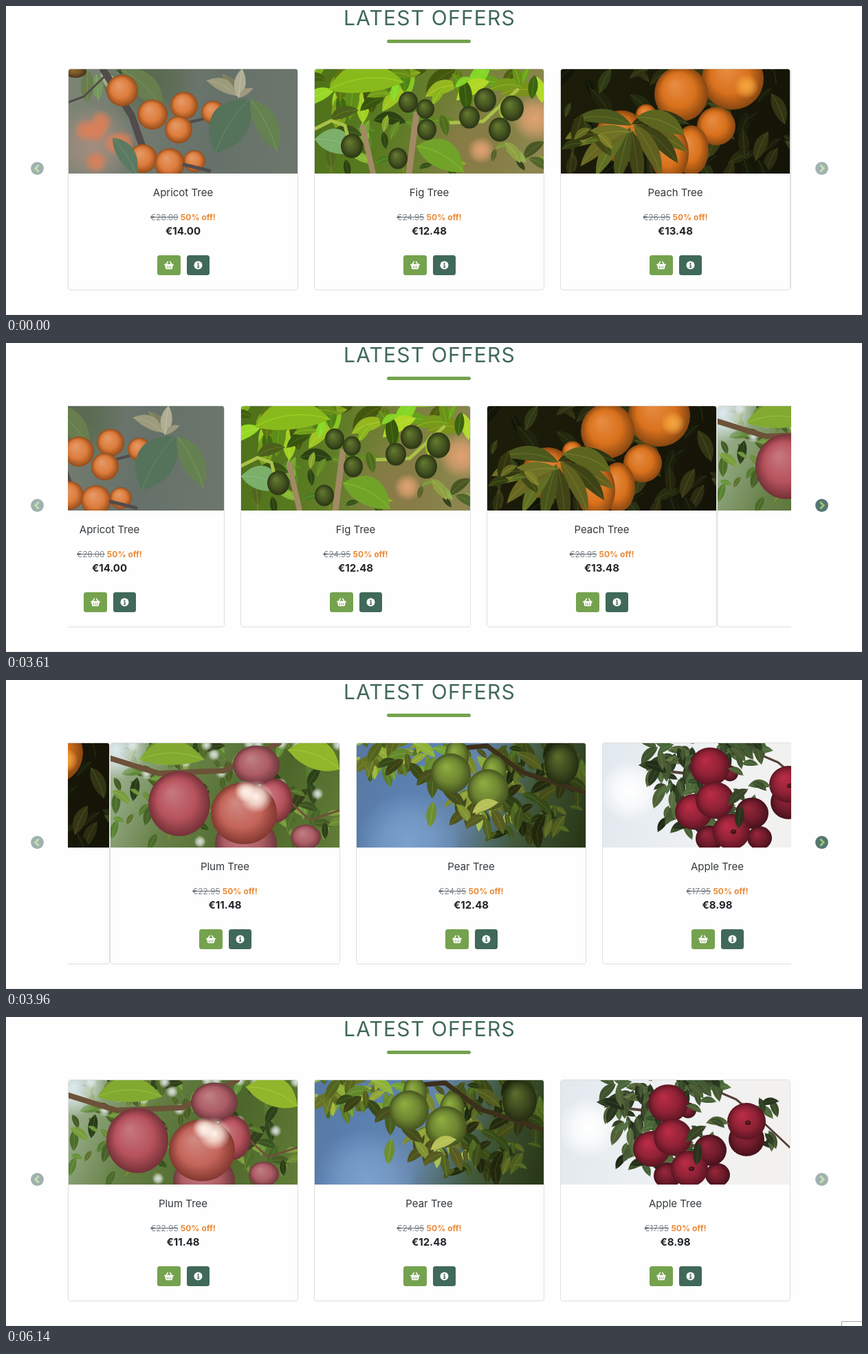
An HTML page with a canvas that plays this animation: 1245 by 450 pixels, repeating every 6.47 s.

```html
<!DOCTYPE html>
<html lang="en">
<head>
<meta charset="utf-8">
<title>Latest offers</title>
<style>
html, body { margin: 0; width: 100%; height: 100%; overflow: hidden; background: #fefefe; }
body { position: relative; font-family: Inter, Arial, sans-serif; color: #212529; }
h2, .bar, .view, .track, .card, .card > *, .arrow, .foot, .tip { position: absolute; margin: 0; }
h2 { left: 0; top: -1px; width: 1232px; line-height: 36px; text-align: center;
  font-size: 30px; font-weight: 400; letter-spacing: 1.2px; color: #406959; }
.bar { left: 554px; top: 48.5px; width: 122px; height: 5.5px; border-radius: 3px; background: #74a24e; }
.view { left: 90px; top: 91px; width: 1051.5px; height: 324px; overflow: hidden; }
.track { inset: 0; animation: slide 6470ms step-end infinite; }
.card { top: 0; width: 333px; height: 321px; border: 1px solid #dfdfdf; border-radius: 4px; overflow: hidden; }
.card canvas { left: 0; top: 0; }
.card p { width: 100%; text-align: center; white-space: nowrap; }
.name { top: 171px; font-size: 15px; line-height: 18px; color: #33383c; }
.cut { top: 208px; font-size: 12px; line-height: 15px; }
.cut s { font-weight: 300; color: #5f686f; }
.cut b { color: #ea8935; }
.now { top: 226.5px; font-size: 15px; line-height: 18px; font-weight: 700; }
.btn { top: 271px; height: 29px; border-radius: 3.5px; }
.buy { left: 129px; width: 34px; background: #74a24e; }
.info { left: 172px; width: 33px; background: #406959; }
.btn svg { display: block; width: 100%; height: 100%; }
.arrow { top: 227px; width: 19px; height: 19px; opacity: .5; }
.prev { left: 35.5px; transform: scaleX(-1); }
.next { left: 1177px; animation: hover 6470ms step-end infinite; }
.foot { left: 0; right: 0; top: 449px; height: 1px; background: #ececec; }
.tip { left: 1215px; top: 443px; width: 30px; height: 7px; box-sizing: border-box; background: #fff;
  border: solid #a8a8a8; border-width: 1px 0 0 1px; opacity: 0; animation: tip 6470ms step-end infinite; }
@keyframes hover {
  0% { opacity: .5; }
  4.32% { opacity: .7; }
  5.25% { opacity: .9; }
  86.7% { opacity: .7; }
  87.94%, 100% { opacity: .5; }
}
@keyframes tip {
  0% { opacity: 0; }
  93.97% { opacity: .5; }
  94.89%, 100% { opacity: 1; }
}
</style>
</head>
<body>
<svg width="0" height="0" style="position:absolute">
  <symbol id="chevron" viewBox="0 0 19 19">
    <circle cx="9.5" cy="9.5" r="9.4" fill="#406965"/>
    <path d="M7.3 4.6 12.2 9.5 7.3 14.4" fill="none" stroke="#98bc5c" stroke-width="2.9"/>
  </symbol>
  <symbol id="basket" viewBox="-17 -14.5 34 29">
    <path d="M-4.2-1-1.6-5.2M4.2-1 1.6-5.2" stroke="#fff" stroke-width="1.5" stroke-linecap="round"/>
    <rect x="-6.8" y="-1.8" width="13.6" height="2.1" rx=".9" fill="#fff"/>
    <path d="M-5.8 0H5.8L4.9 4.8Q4.7 5.8 3.7 5.8H-3.7Q-4.7 5.8-4.9 4.8Z" fill="#fff"/>
    <path d="M-2.6 1.3V4.3M0 1.3V4.3M2.6 1.3V4.3" stroke="#74a24e"/>
  </symbol>
  <symbol id="about" viewBox="-16.5 -14.5 33 29">
    <circle r="6" fill="#fff"/>
    <circle cy="-2.7" r="1.1" fill="#406959"/>
    <path d="M-1.4-.4H.5V3M-1.6 3H1.7" fill="none" stroke="#406959" stroke-width="1.3"/>
  </symbol>
</svg>

<h2>LATEST OFFERS</h2>
<div class="bar"></div>
<svg class="arrow prev"><use href="#chevron"/></svg>
<div class="view"><div class="track"></div></div>
<svg class="arrow next"><use href="#chevron"/></svg>
<div class="foot"></div>
<div class="tip"></div>

<script>
const LOOP = 6470, PAGE = 1051, W = 333, H = 152;

// one page glides past with a sine ease, held for a tick at a time
function slideRule() {
  const first = 3480, tick = 65, start = 3505, span = 509;
  let css = '0% { transform: none; }';
  for (let k = 1; k < 10; k++) {
    const t = first + k * tick, p = Math.min(1, (t - start) / span);
    const x = Math.round(PAGE * (1 - Math.cos(Math.PI * p)) / 2);
    css += `${((t - 1) / LOOP * 100).toFixed(2)}% { transform: translateX(${-x}px); }`;
  }
  return `@keyframes slide { ${css} 100% { transform: translateX(${-PAGE}px); } }`;
}
const style = document.createElement('style');
style.textContent = slideRule();
document.head.append(style);

let c, seed;
const rand = () => (seed = (seed * 16807) % 2147483647) / 2147483647;
const vary = amount => (rand() - .5) * 2 * amount;
const hsl = ([h, s, l], lift = 0) => `hsl(${h} ${s}% ${l + lift}%)`;

function fade(x, y, ...cols) {
  const g = c.createLinearGradient(0, 0, x, y);
  cols.forEach((col, i) => g.addColorStop(i / (cols.length - 1), col));
  c.fillStyle = g;
  c.fillRect(0, 0, W, H);
}

function glow(col, x, y, r) {
  const g = c.createRadialGradient(x, y, 0, x, y, r);
  g.addColorStop(0, col);
  g.addColorStop(.5, col + 'b0');
  g.addColorStop(1, col + '00');
  c.fillStyle = g;
  c.fillRect(x - r, y - r, 2 * r, 2 * r);
}

function fruit(col, tall, ...spots) {
  for (const [x, y, r] of spots) {
    c.save();
    c.translate(x, y);
    c.scale(r, r * tall);
    const g = c.createRadialGradient(-.25, -.35, .05, 0, 0, 1);
    g.addColorStop(0, hsl(col, 10));
    g.addColorStop(.6, hsl(col));
    g.addColorStop(1, hsl(col, -col[2] * .38));
    c.fillStyle = g;
    c.beginPath();
    c.arc(0, 0, 1, 0, 7);
    c.fill();
    c.restore();
  }
}

// an arching leaf with a midrib, growing from its stalk
function leaf(col, x, y, len, angle, wide = .26) {
  const w = len * wide, sag = len * .15 * Math.cos(angle);
  c.save();
  c.translate(x, y);
  c.rotate(angle);
  c.beginPath();
  c.moveTo(0, 0);
  c.bezierCurveTo(len * .25, w - sag, len * .7, w - sag, len, 0);
  c.bezierCurveTo(len * .7, -w - sag, len * .25, -w - sag, 0, 0);
  c.fillStyle = hsl(col);
  c.fill();
  c.beginPath();
  c.moveTo(0, 0);
  c.quadraticCurveTo(len / 2, -sag * 1.4, len, 0);
  c.strokeStyle = hsl(col, 9);
  c.lineWidth = .8;
  c.stroke();
  c.restore();
}

function foliage(n, [x, y, w, h], size, angle, [hue, sat, light]) {
  while (n--) {
    const shade = [hue + vary(9), sat, light * (1 + vary(.5))];
    leaf(shade, x + rand() * w, y + rand() * h, size * (.8 + vary(.35)), angle + vary(1.3));
  }
}

function twig(col, width, ...pts) {
  c.strokeStyle = col;
  c.lineWidth = width;
  c.lineJoin = c.lineCap = 'round';
  c.beginPath();
  pts.forEach(p => c.lineTo(...p));
  c.stroke();
}

function apricot() {
  const bark = '#514b4c', green = [88, 24, 40];
  fade(W, 60, '#7c8474', '#737b70', '#657169', '#6d766c');
  glow('#58694f', 120, 15, 70);
  glow('#a18d7f', 35, 110, 60);
  for (let i = 0; i < 6; i++) glow('#dc7f58', 25 + rand() * 65, 60 + rand() * 85, 18);
  foliage(7, [0, 0, 110, 8], 46, .8, green);
  leaf(green, 76, 0, 86, .77);
  twig(bark, 3, [53, 10], [22, 40], [0, 48]);
  twig(bark, 10, [50, 0], [92, 68], [110, 120]);
  twig(bark, 4, [165, 80], [225, 65]);
  foliage(6, [240, 34, 12, 8], 42, -1.6, [55, 14, 46]);
  fruit([24, 70, 55], 1, [78, 31, 23], [122, 66, 22], [210, 63, 17], [168, 53, 20], [160, 88, 20],
    [108, 130, 21], [183, 134, 16], [147, 137, 22]);
  fruit([35, 48, 30], .6, [10, 3, 16]);
  leaf([130, 15, 39], 262, 44, 92, 2.13, .4);
  leaf([95, 23, 41], 265, 44, 84, 1.1);
  leaf([130, 14, 42], 64, 100, 64, 1);
  twig(bark, 5, [168, 139], [205, 148]);
}

function fig() {
  const stem = '#a28a66', lime = '#a9c148';
  fade(W, 90, '#4d7019', '#587a20', '#78803c', '#8d8650');
  glow('#8a7b48', 230, 120, 75);
  glow('#e2a272', 242, 118, 20);
  glow('#e2a272', 320, 72, 34);
  foliage(55, [0, -12, W, 55], 50, 2.2, [80, 70, 34]);
  foliage(28, [0, 60, 195, 85], 42, .8, [84, 55, 31]);
  foliage(8, [255, 105, 70, 40], 36, .6, [75, 40, 34]);
  leaf([79, 74, 42], 20, 30, 110, -.1);
  leaf([105, 30, 55], 0, 102, 62, .3, .38);
  leaf([84, 60, 40], 148, 112, 78, .5, .35);
  twig(lime, 5, [0, 87], [24, 75], [44, 82], [48, 98]);
  twig(lime, 5, [198, 78], [245, 76], [295, 30]);
  twig(stem, 9, [148, 66], [137, 152]);
  twig(stem, 8, [70, 85], [85, 152]);
  fruit([78, 44, 23], 1.1, [136, 48, 14], [161, 58, 13], [163, 88, 14], [121, 130, 14],
    [287, 57, 17], [225, 70, 15], [248, 45, 16], [269, 88, 16], [54, 112, 16]);
}

function peach() {
  const ripe = [27, 77, 48], olive = [68, 52, 26];
  fade(W, H, '#1d1d0a', '#141307');
  foliage(75, [0, -15, W, H], 46, 1.6, [70, 45, 11]);
  fruit(ripe, 1, [124, 66, 15], [250, 14, 45], [226, 83, 28], [88, 98, 38]);
  fruit(ripe, 1.45, [190, 118, 25], [158, 122, 28]);
  fruit(ripe, 1.03, [175, 36, 39]);
  glow('#f4a63e', 270, 25, 18);
  for (let i = 0; i < 10; i++) leaf([68 + vary(9), 50, 22 + vary(9)], 100 + vary(8), 86 + vary(7), 84, i * .36, .17);
  leaf(olive, 110, 70, 74, .35);
  foliage(8, [30, 65, 30, 45], 45, 1.9, olive);
}

function plum() {
  const skin = [354, 41, 52], bark = '#6c5238';
  fade(W, H, '#a9bda0', '#668047', '#4c662a', '#627d38');
  foliage(130, [-15, -15, W, H], 32, 1, [83, 42, 30]);
  for (let i = 0; i < 22; i++) glow('#dbe4dd', rand() * W, rand() ** 2 * H, 9);
  glow('#dde9f0', 8, 8, 45);
  leaf([80, 55, 43], 42, 24, 94, 0);
  leaf([76, 62, 44], 333, 38, 80, 3.5, .35);
  twig(bark, 8, [0, 22], [70, 44], [165, 40], [245, 0]);
  twig(bark, 3, [250, 75], [290, 112], [333, 98]);
  fruit([354, 33, 52], .84, [212, 32, 34], [284, 137, 22], [197, 146, 45]);
  fruit(skin, 1.2, [238, 84, 27]);
  fruit(skin, 1.05, [100, 88, 45]);
  fruit([6, 47, 56], .94, [194, 102, 48]);
  glow('#fff4ea', 212, 78, 24);
  glow('#fff4ea', 196, 70, 16);
}

function pear() {
  const skin = [77, 46, 36];
  fade(W, 110, '#5878a2', '#5a80b1', '#6485a9', '#41583a', '#293818');
  glow('#7ba0cc', 75, 145, 75);
  foliage(48, [5, -14, 125, 52], 36, 1.7, [76, 50, 32]);
  foliage(45, [110, 0, 110, 100], 38, 1.6, [75, 47, 32]);
  foliage(80, [200, -14, 130, 145], 38, 1.5, [78, 50, 19]);
  twig('#3c301b', 7, [140, 8], [190, 4], [240, 42], [W, 72]);
  fruit([78, 42, 20], 1.2, [298, 30, 25]);
  for (const [x, y, r] of [[137, 44, 29], [191, 68, 30]]) {
    fruit(skin, 1.4, [x + r * .3, y - r * .85, r * .6]);
    fruit(skin, 1, [x, y, r]);
  }
  foliage(14, [145, 85, 100, 25], 38, 1.6, [70, 46, 40]);
}

function apple() {
  const skin = [349, 62, 35], green = [92, 27, 23], bark = '#554338';
  fade(W, 50, '#e1e9ef', '#eff1f2', '#f3f1ef');
  glow('#ffffff', 40, 70, 45);
  twig(bark, 3, [190, 0], [255, 28], [295, 62], [W, 98]);
  twig(bark, 4, [85, 40], [130, 45], [180, 70]);
  foliage(48, [75, 0, 75, 62], 34, 2.5, green);
  foliage(28, [165, -12, 75, 32], 34, .9, green);
  foliage(45, [95, 65, 135, 58], 32, 2, green);
  foliage(9, [285, 25, 25, 70], 26, .6, green);
  fruit([349, 60, 27], .95, [155, 139, 20], [228, 138, 18], [270, 86, 26], [217, 102, 24], [185, 44, 12]);
  fruit(skin, .96, [156, 34, 29], [132, 100, 27], [163, 83, 28], [187, 129, 27], [270, 60, 28]);
  foliage(6, [165, 10, 55, 85], 34, .4, green);
  fruit([355, 45, 18], .8, [272, 62, 4], [190, 129, 4]);
}

const offers = [
  ['Apricot', '28.00', '14.00', apricot],
  ['Fig', '24.95', '12.48', fig],
  ['Peach', '26.95', '13.48', peach],
  ['Plum', '22.95', '11.48', plum],
  ['Pear', '24.95', '12.48', pear],
  ['Apple', '17.95', '8.98', apple]
];
const track = document.querySelector('.track');

offers.forEach(([name, was, now, paint], i) => {
  const card = document.createElement('div');
  card.className = 'card';
  card.style.left = Math.floor(i / 3) * PAGE + (i % 3) * 358 + 'px';
  card.innerHTML = `<canvas width="${W}" height="${H}"></canvas>
    <p class="name">${name} Tree</p>
    <p class="cut"><s>€${was}</s> <b>50% off!</b></p>
    <p class="now">€${now}</p>
    <div class="btn buy"><svg><use href="#basket"/></svg></div>
    <div class="btn info"><svg><use href="#about"/></svg></div>`;
  track.append(card);
  c = card.querySelector('canvas').getContext('2d');
  seed = 71 + i * 997;
  paint();
});
</script>
</body>
</html>
```
